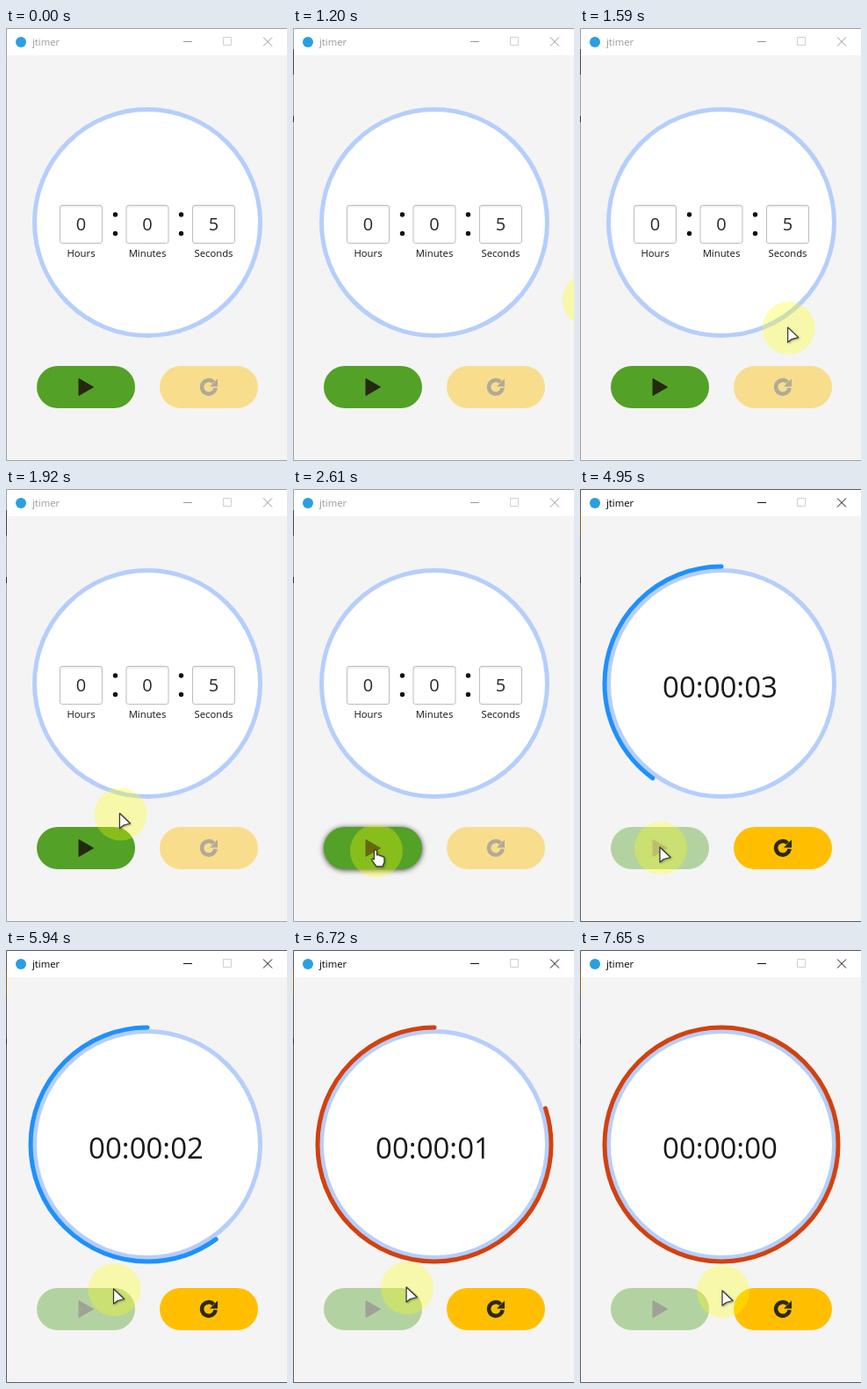
An HTML page for the animation above (8 s loop, 320 by 492 pixels).

```html
<!DOCTYPE html>
<html lang="en">
<head>
<meta charset="utf-8">
<title>jtimer</title>
<style>
  html, body { margin: 0; width: 100%; height: 100%; overflow: hidden; background: #f4f4f4; }
  svg { display: block; width: 320px; height: 492px; }
  text { font-family: "Open Sans", "Noto Sans", sans-serif; font-size: 11.3px; fill: #111; }
  .mid { text-anchor: middle; }
  .digit { font-size: 20px; fill: #2a2a2a; }
  #time { font-size: 33px; fill: #1a1a1a; }
  .hover { filter: drop-shadow(0 1px 3px rgba(0, 0, 0, .75)); }
</style>
</head>
<body>
<svg viewBox="0 0 320 492">
  <defs>
    <linearGradient id="field" x2="0" y2="1">
      <stop offset="0" stop-color="#e9e9e9"/><stop offset=".09" stop-color="#fff"/>
    </linearGradient>
  </defs>
  <rect width="320" height="492" fill="#f4f4f4"/>
  <rect width="320" height="31" fill="#fff"/>
  <path id="frame" d="M320 .5H.5V491.5H320" fill="none"/>
  <g id="edge"><path id="edgeTop" d="M0 24h1v29h-1z"/><path d="M0 100h1v7h-1z" fill="#333"/></g>

  <circle cx="17" cy="16" r="6" fill="#2a9fe0"/>
  <text id="title" x="30" y="20">jtimer</text>
  <path d="M247.5 10.5h9v9h-9z" fill="none" stroke="#d0d0d0"/>
  <path id="controls" d="M202 15.5h10M293 10.500l10 10m0-10l-10 10" fill="none"/>

  <circle cx="161" cy="221" r="128.500" fill="#fff" stroke="#b5cefc" stroke-width="5"/>
  <circle id="arc" r="133" pathLength="100" transform="translate(161 221) rotate(-90) scale(1 -1)"
    fill="none" stroke-width="5" stroke-linecap="round"/>
  <g id="setup"></g>
  <text id="time" class="mid" x="159.500" y="237"></text>

  <g id="play">
    <rect x="35" y="384" width="112" height="48" rx="24" fill="#53a127"/>
    <path d="M83 398.500L99.500 408L83 417.500Z" fill="#24280f" stroke="#24280f" stroke-linejoin="round"/>
  </g>
  <g id="reset">
    <rect x="175" y="384" width="112" height="48" rx="24" fill="#ffbf00"/>
    <g id="resetIcon">
      <path d="M236.500 402.500A7.800 7.800 0 1 0 238.600 409" fill="none" stroke="#2b2a20" stroke-width="4.500"/>
      <path d="M241 398.500V407.500H232Z" fill="#2b2a20"/>
    </g>
  </g>

  <g id="pointer">
    <circle r="30" fill="#ff0" opacity=".3"/>
    <g id="rings" fill="none" stroke="#e2571c" stroke-width="3"><circle id="outer"/><circle id="inner"/></g>
    <g stroke="#333" stroke-width="1.200" stroke-linejoin="round" fill="#fff"
      style="filter: drop-shadow(1px 1px 1px rgba(0,0,0,.35))">
      <path id="arrow" d="M-1 -1V16L3.500 12.500L11 10.500Z"/>
      <path id="hand" d="M-2.500 9V1Q-2.500 -1 -1 -1T.6 1V5Q3 4 4 6Q6 5 6.500 7Q9 6 9 9V13L7 18H0L-5 11Q-6 8 -2.500 10Z"/>
    </g>
  </g>
</svg>
<script>
const $ = id => document.getElementById(id);
const set = (id, attrs) => { for (const k in attrs) $(id).setAttribute(k, attrs[k]); };
const show = (id, on) => $(id).style.display = on ? '' : 'none';

const LOOP = 8000, ACTIVE = 2940, START = 3060, FIRST_TICK = 4020, TICK = 900;
const HOVER = 1970;

// Pointer path: time, x, y
const path = [
  [1140, 352, 304], [1590, 238, 341], [1950, 121, 372], [1980, 114, 385], [2340, 95, 411],
  [2610, 95, 411], [2700, 92, 408], [5700, 92, 408], [5940, 123.500, 386], [6180, 130, 384],
  [6720, 130, 384], [7050, 163, 388], [LOOP, 163, 388]
];

$('setup').innerHTML = [['Hours', 0], ['Minutes', 0], ['Seconds', 5]].map(([label, value], i) => {
  const x = 85.500 + i * 75.500;
  const dots = i < 2 ? [212, 233.500].map(y => `<circle cx="${124.500 + i * 75}" cy="${y}" r="2.700" fill="#111"/>`).join('') : '';
  return `<rect x="${x - 24}" y="201.500" width="48" height="43" rx="2.500" fill="url(#field)" stroke="#bdbdbd"/>
    <text class="mid digit" x="${x}" y="230">${value}</text>
    <text class="mid" x="${x}" y="260">${label}</text>${dots}`;
}).join('');

function pointerAt(t) {
  const i = Math.max(1, path.findIndex(p => p[0] >= t));
  const [t0, x0, y0] = path[i - 1], [t1, x1, y1] = path[i];
  const k = Math.max(0, (t - t0) / (t1 - t0));
  return [x0 + (x1 - x0) * k, y0 + (y1 - y0) * k];
}

function draw(t) {
  const active = t >= ACTIVE, running = t >= START;
  const hover = t >= HOVER && !running;
  const ticks = Math.max(0, Math.min(5, Math.floor((t - FIRST_TICK) / TICK) + 1));

  set('frame', { stroke: active ? '#5a5a5a' : '#a0a0a0' });
  set('title', { style: `fill:${active ? '#000' : '#999'}` });
  set('controls', { stroke: active ? '#111' : '#999' });
  show('edge', t >= 540);
  set('edgeTop', { fill: t >= 4500 ? '#8a5c1c' : active ? '#d9822b' : '#444' });

  show('setup', !running);
  show('time', running);
  $('time').textContent = '00:00:0' + (5 - ticks);
  show('arc', ticks > 0);
  set('arc', {
    stroke: ticks > 3 ? '#d3410f' : '#1e90ff',
    'stroke-dasharray': ticks < 5 ? `${ticks * 20} 200` : 'none'
  });

  set('play', { opacity: running ? .4 : 1, class: hover ? 'hover' : '' });
  set('reset', { opacity: running ? 1 : .42 });
  set('resetIcon', { opacity: running ? 1 : .8 });

  const [x, y] = pointerAt(t);
  show('pointer', t >= 1170);
  set('pointer', { transform: `translate(${x} ${y})` });
  show('arrow', !hover);
  show('hand', hover);

  const p = (t - ACTIVE) / 480;
  show('rings', p > 0 && p < 1);
  if (p > 0 && p < 1) {
    set('outer', { r: 34 * p, opacity: .9 * (1 - p) });
    set('inner', { r: 22 * p, opacity: .5 * (1 - p) });
  }
}

function loop() {
  draw(performance.now() % LOOP);
  requestAnimationFrame(loop);
}
loop();
</script>
</body>
</html>
```
